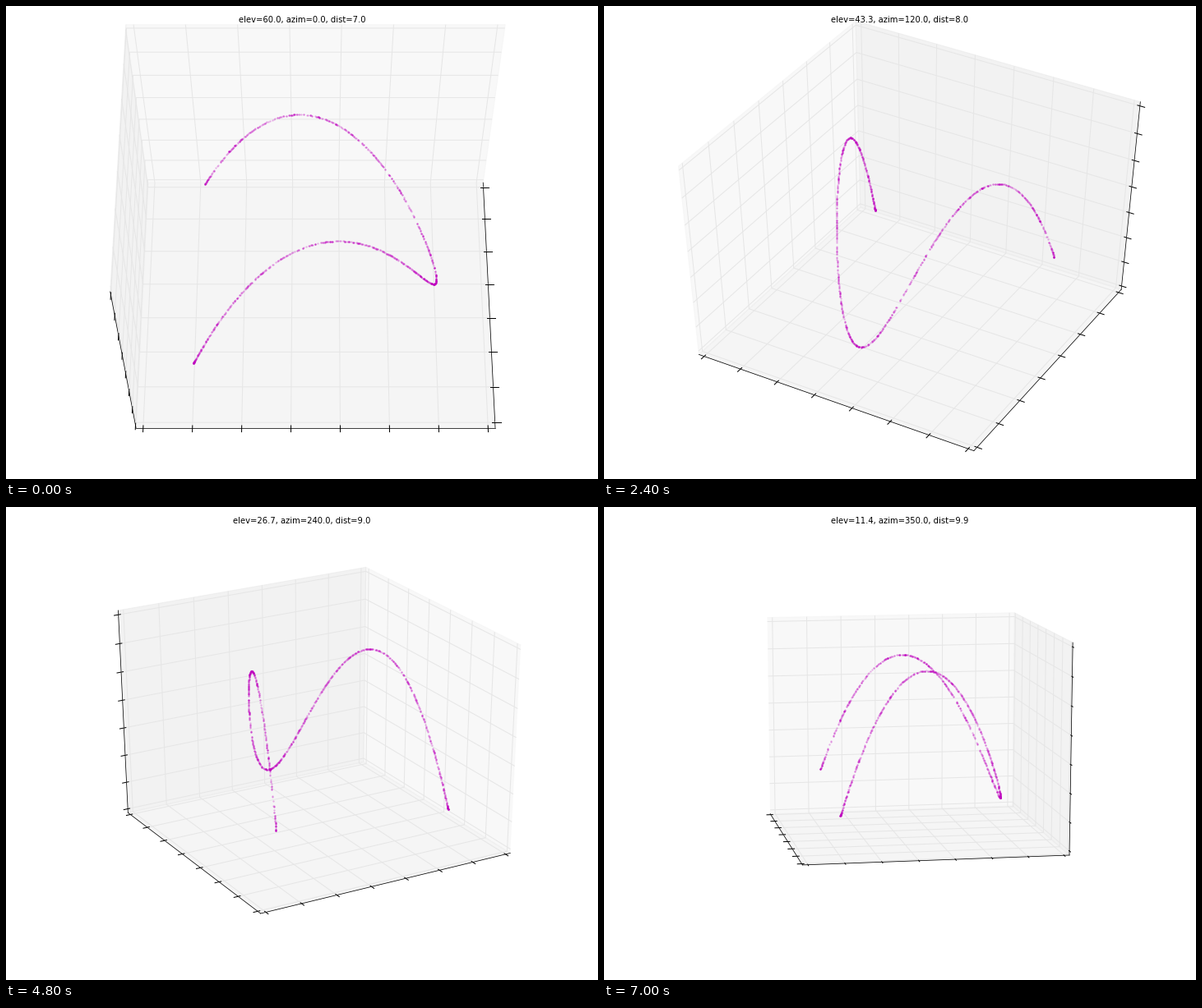
Recreate the animation shown at these times as a matplotlib script. Size 720 by 576 pixels, loop 7200 ms.

```python
import numpy as np
import matplotlib.pyplot as plt
from matplotlib.animation import FuncAnimation
from matplotlib.collections import LineCollection
from matplotlib.patches import Polygon

FRAMES, INTERVAL = 36, 200
LOW, HIGH = -0.2, 1.2            # data limits on every axis
EDGE = 0.5 + 1 / 48              # half width of the box, with its margin
TICKS = np.arange(8) / 7 - 0.5
DELTA = 1 / 12
GREYS = (0.95, 0.90, 0.925)      # panes across x, y, z
FLIPS = ((1, 0), (0, 1), (0, 2)) # axes flipped to reach each axis line
TICK_DIRS = (1, 0, 0)


def logistic_orbit(count, rate=3.99, start=0.5):
    orbit = [start]
    for _ in range(count - 1):
        x = orbit[-1]
        orbit.append(x * rate * (1 - x))
    return np.array(orbit)


class Camera:
    """Perspective view of a unit cube centred on the origin."""

    def __init__(self, elev, azim, dist):
        e, a = np.radians((elev, azim))
        self.dist = dist
        self.toward = np.array([np.cos(e) * np.cos(a), np.cos(e) * np.sin(a), np.sin(e)])
        self.right = np.array([-np.sin(a), np.cos(a), 0])
        self.up = np.cross(self.toward, self.right)

    def project(self, points):
        p = np.asarray(points, float)
        depth = self.dist - p @ self.toward
        return np.stack([p @ self.right / depth, p @ self.up / depth], axis=-1)


def pane_corners(axis, far):
    b, c = [i for i in range(3) if i != axis]
    corners = np.zeros((4, 3))
    corners[:, axis] = far[axis]
    corners[:, b] = np.array([-1, 1, 1, -1]) * EDGE
    corners[:, c] = np.array([-1, -1, 1, 1]) * EDGE
    return corners


def axis_line(axis, far):
    first, second = FLIPS[axis]
    start = far.copy()
    start[first] *= -1
    end = start.copy()
    end[second] *= -1
    return start, end


def grid_lines(axis, far):
    lines = np.tile(far, (len(TICKS), 3, 1))
    lines[:, :, axis] = TICKS[:, None]
    lines[:, 0, (axis + 1) % 3] *= -1
    lines[:, 2, (axis + 2) % 3] *= -1
    return lines


def tick_lines(axis, far, start):
    side = TICK_DIRS[axis]
    step = np.sign(far[side]) * DELTA
    lines = np.tile(start, (len(TICKS), 2, 1))
    lines[:, :, axis] = TICKS[:, None]
    lines[:, 0, side] += 0.1 * step
    lines[:, 1, side] -= 0.2 * step
    return lines


fig = plt.figure(figsize=(10, 8), dpi=72, facecolor="white")
ax = fig.add_axes([0.125, 0.125, 0.775, 0.775])
ax.set_axis_off()
ax.set_xlim(-0.095, 0.09)
ax.set_ylim(-0.095, 0.09)
title = fig.text(0.5, 0.98, "", ha="center", va="top", size=10, family="DejaVu Sans")


def add_lines(zorder, **style):
    lines = LineCollection([], zorder=zorder, clip_on=False, **style)
    ax.add_collection(lines, autolim=False)
    return lines


panes, axis_rules, grids, ticks = [], [], [], []
for i, grey in enumerate(GREYS):
    pane = Polygon(np.zeros((4, 2)), closed=False, color=(grey,) * 3, alpha=0.5,
                   lw=1, zorder=1 + i, clip_on=False)
    panes.append(ax.add_patch(pane))
    z = 10 + 3 * i
    axis_rules.append(add_lines(z, colors="black", linewidths=0.75, capstyle="projecting"))
    grids.append(add_lines(z + 1, colors=[(0.9, 0.9, 0.9)], linewidths=1))
    ticks.append(add_lines(z + 2, colors="black", linewidths=1, capstyle="projecting"))

orbit = logistic_orbit(1000)
cloud = (np.stack([orbit[:-2], orbit[1:-1], orbit[2:]], axis=1) - 0.5) / (HIGH - LOW)
dots = ax.scatter(cloud[:, 0], cloud[:, 1], s=5, color=(0.75, 0, 0.75), alpha=0.3,
                  linewidths=0, zorder=30)


def update(n):
    part = n / FRAMES
    elev, azim, dist = 60 - 50 * part, 10.0 * n, 7 + 3 * part
    cam = Camera(elev, azim, dist)
    far = np.where(cam.toward < 0, EDGE, -EDGE)
    for i in range(3):
        start, end = axis_line(i, far)
        panes[i].set_xy(cam.project(pane_corners(i, far)))
        axis_rules[i].set_segments([cam.project([start, end])])
        grids[i].set_segments(cam.project(grid_lines(i, far)))
        ticks[i].set_segments(cam.project(tick_lines(i, far, start)))
    dots.set_offsets(cam.project(cloud))
    # exact halves round down
    title.set_text(f"elev={elev:.1f}, azim={azim:.1f}, dist={dist - 1e-9:.1f}")
    return [*panes, *axis_rules, *grids, *ticks, dots, title]


anim = FuncAnimation(fig, update, frames=FRAMES, interval=INTERVAL, repeat=True,
                     repeat_delay=0, blit=False)
plt.show()
```
